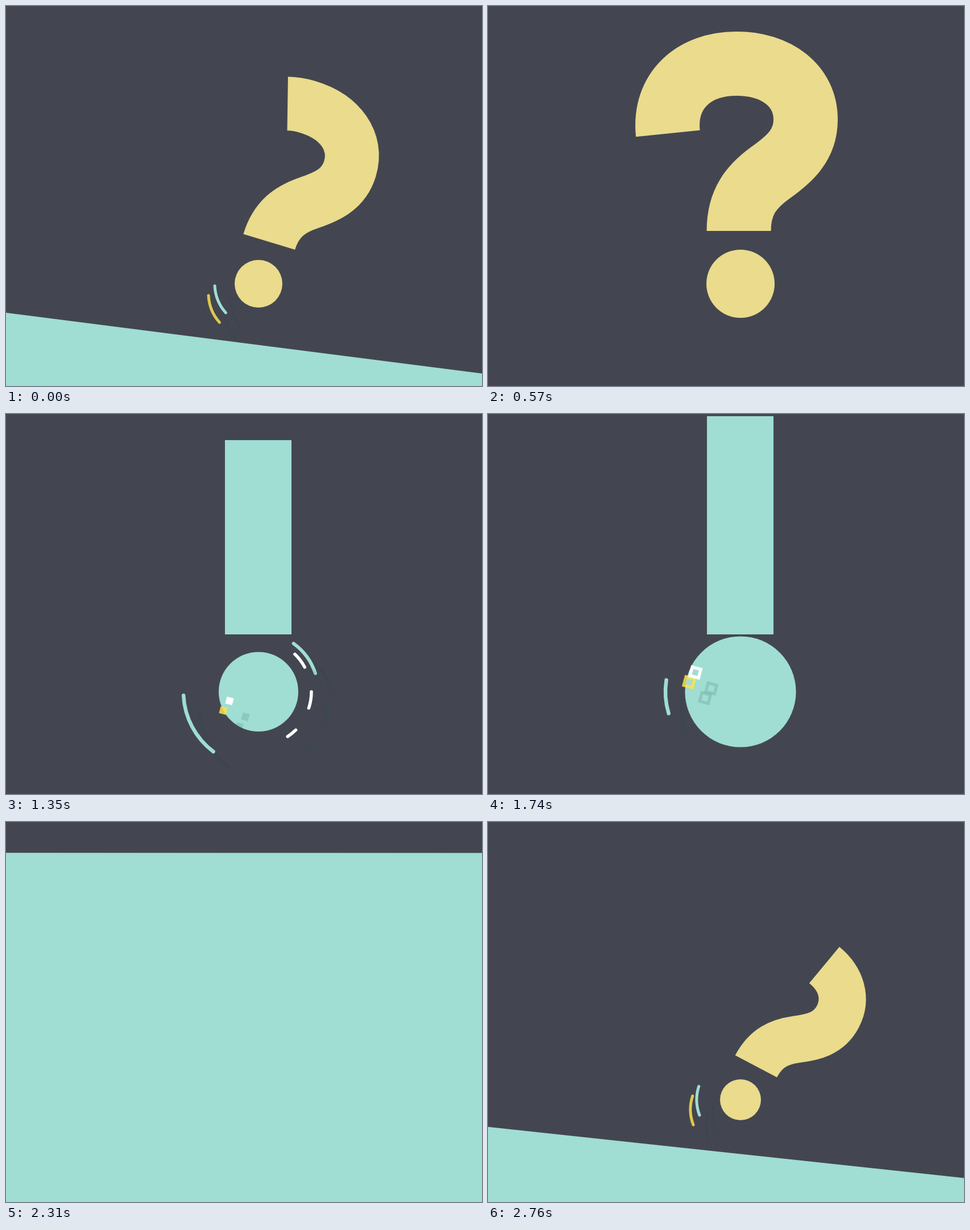
Write an HTML page with a canvas that moves like this. It is 837 px wide and 669 px high and loops after 2.79 s.

```html
<!DOCTYPE html>
<html>
<head>
<meta charset="utf-8">
<style>
  html, body { margin: 0; width: 100%; height: 100%; overflow: hidden; background: #434650; }
  canvas { display: block; }
</style>
</head>
<body>
<canvas id="stage" width="837" height="669"></canvas>
<script>
const ctx = document.getElementById('stage').getContext('2d');
const LOOP = 2790, STEP = 30, CX = 444, CY = 489;
const DARK = '#434650', TEAL = '#a0ddd3', SAND = '#eadb8d', WHITE = '#fff';
const GOLD = 'rgba(255,226,75,.83)', SHADE = 'rgba(25,75,80,.14)';
const HOOK = new Path2D('M441 396C441 345 463 318 496 294C530 270 558.5 245 558.5 200' +
  'C558.5 140 507 101.5 437 101.5C360 101.5 306 151 317 230');
const HOOK_LENGTH = 612;

const rad = deg => deg * Math.PI / 180;
const mix = (a, b, p) => a + (b - a) * p;
const span = (t, from, to) => Math.min(1, Math.max(0, (t - from) / (to - from)));
const outQuad = p => 1 - (1 - p) ** 2;
const inOutSine = p => (1 - Math.cos(Math.PI * p)) / 2;
const outBack = (p, c) => 1 - (1 - p) ** 2 * ((c + 1) * (1 - p) - c);

function disc(r, color) {
  if (r <= 0) return;
  ctx.fillStyle = color;
  ctx.beginPath();
  ctx.arc(CX, CY, r, 0, 2 * Math.PI);
  ctx.fill();
}

// Draws a shape with its drop shadow and, if asked, a golden echo.
function layered(draw, color, echo) {
  const layers = [[28, 28, SHADE], [0, 0, color]];
  if (echo) layers.unshift([17, 45, SHADE], [-11, 17, GOLD]);
  for (const [dx, dy, paint] of layers) {
    ctx.save();
    ctx.translate(dx, dy);
    ctx.strokeStyle = paint;
    draw();
    ctx.restore();
  }
}

function arc(r, a, b, width, color, echo = false, x = CX, y = CY) {
  if (Math.abs(a - b) < 0.2) return;
  layered(() => {
    ctx.lineWidth = width;
    ctx.lineCap = 'round';
    ctx.beginPath();
    ctx.arc(x, y, r, rad(Math.min(a, b)), rad(Math.max(a, b)));
    ctx.stroke();
  }, color, echo);
}

// Arc whose head runs from a to b, followed by its tail.
function sweep(t, head, tail, r, a, b, width, color, x, y) {
  arc(r, mix(a, b, inOutSine(span(t, ...tail))), mix(a, b, outQuad(span(t, ...head))),
    width, color, false, x, y);
}

function fallingFloor(t) {
  const p = (t + 540) / 540;
  const left = t < 0
    ? 540 * Math.sin(Math.PI / 2 * p ** 1.25)
    : 540 + t / 5 + t * t / 600;
  const right = left + 837 * Math.tan(rad(7.28 * p ** 3));
  ctx.fillStyle = TEAL;
  ctx.beginPath();
  ctx.moveTo(0, left);
  ctx.lineTo(837, right);
  ctx.lineTo(837, Math.max(right, 669));
  ctx.lineTo(0, Math.max(left, 669));
  ctx.fill();
}

function question(t) {
  const leave = span(t, 590, 780) ** 2;
  const shown = outQuad(span(t, -130, 131)) * (1 - leave);
  const size = outBack(span(t, -145, 270), 0.777);
  if (shown > 0 && size > 0) {
    ctx.save();
    ctx.translate(436.5, CY);
    ctx.rotate(rad(105 * (1 - size) - 10 * leave));
    ctx.scale(size, size);
    ctx.translate(-436.5, -CY);
    ctx.strokeStyle = SAND;
    ctx.lineWidth = 113;
    ctx.setLineDash([HOOK_LENGTH * shown, 2 * HOOK_LENGTH]);
    ctx.stroke(HOOK);
    ctx.restore();
  }
  if (t < 840) disc(60 * outQuad(span(t, -160, 194)), SAND);
}

function exclamation(t) {
  const hole = 126 * outQuad(span(t, 750, 946));
  if (hole < 126) {
    disc(126 * outQuad(span(t, 660, 840)), TEAL);
    disc(hole, DARK);
  }
  const height = t < 1500
    ? 342 * outBack(span(t, 780, 1080), 2.05)
    : 342 * outBack(1 - span(t, 1650, 1900), 2.05);
  ctx.fillStyle = TEAL;
  ctx.fillRect(385, 388 - height, 117, height);
  disc(70 * outBack(span(t, 790, 1150), 1.7) + 600 * span(t, 1620, 2070) ** 2.33, TEAL);
}

function orbiter(t) {
  if (t < -285 || t > 295) return;
  const turn = Math.max(-1, Math.min(1, (t - 90) / 366));
  const mid = 90 - 180 * Math.sin(Math.PI / 2 * turn);
  const half = 3 + 16.5 * Math.cos(Math.PI * (t + 9) / 600) ** 2;
  arc(77, mid - half, mid + half, 5, TEAL, true);
}

function squares(t) {
  if (t <= 1260 || t >= 1995) return;
  const p = outQuad(span(t, 1260, 2010));
  const side = 21 * outQuad(span(t, 1260, 1508));
  const line = side / 2 * (1 - span(t, 1500, 1995));
  layered(() => {
    ctx.translate(mix(403, 359, p), mix(522.5, 445, p));
    ctx.rotate(rad(15));
    ctx.lineWidth = line;
    ctx.strokeRect((line - side) / 2, (line - side) / 2, side - line, side - line);
  }, WHITE, true);
}

function sparks(t) {
  sweep(t, [200, 340], [270, 540], 118, 99, -4, 7.5, SAND);
  sweep(t, [259, 559], [330, 560], 150, -94, -40, 6, WHITE, 417, 292);
  sweep(t, [780, 900], [840, 1040], 150.8, -63.6, -43, 9, WHITE, 444, 302);
  const head = [1290, 1410], tail = [1350, 1560];
  sweep(t, head, tail, 105, -54, -6, 6, TEAL);
  sweep(t, head, tail, 92, -46, -22, 5.5, WHITE);
  sweep(t, head, tail, 93, 0, 24, 5.5, WHITE);
  sweep(t, head, tail, 94, 57, 42, 5.5, WHITE);
  sweep(t, [1215, 1455], [1350, 2055], 132, 127, 189, 6.5, TEAL);
}

function frame(now) {
  // The motion advances in even steps; the small lead absorbs timer jitter.
  const time = Math.floor((now + 8) / STEP) * STEP % LOOP;
  const t = time >= 2250 ? time - LOOP : time;
  ctx.fillStyle = DARK;
  ctx.fillRect(0, 0, 837, 669);
  if (t < 300) fallingFloor(t);
  question(t);
  exclamation(t);
  sparks(t);
  orbiter(t);
  squares(t);
  requestAnimationFrame(frame);
}

requestAnimationFrame(frame);
</script>
</body>
</html>
```
